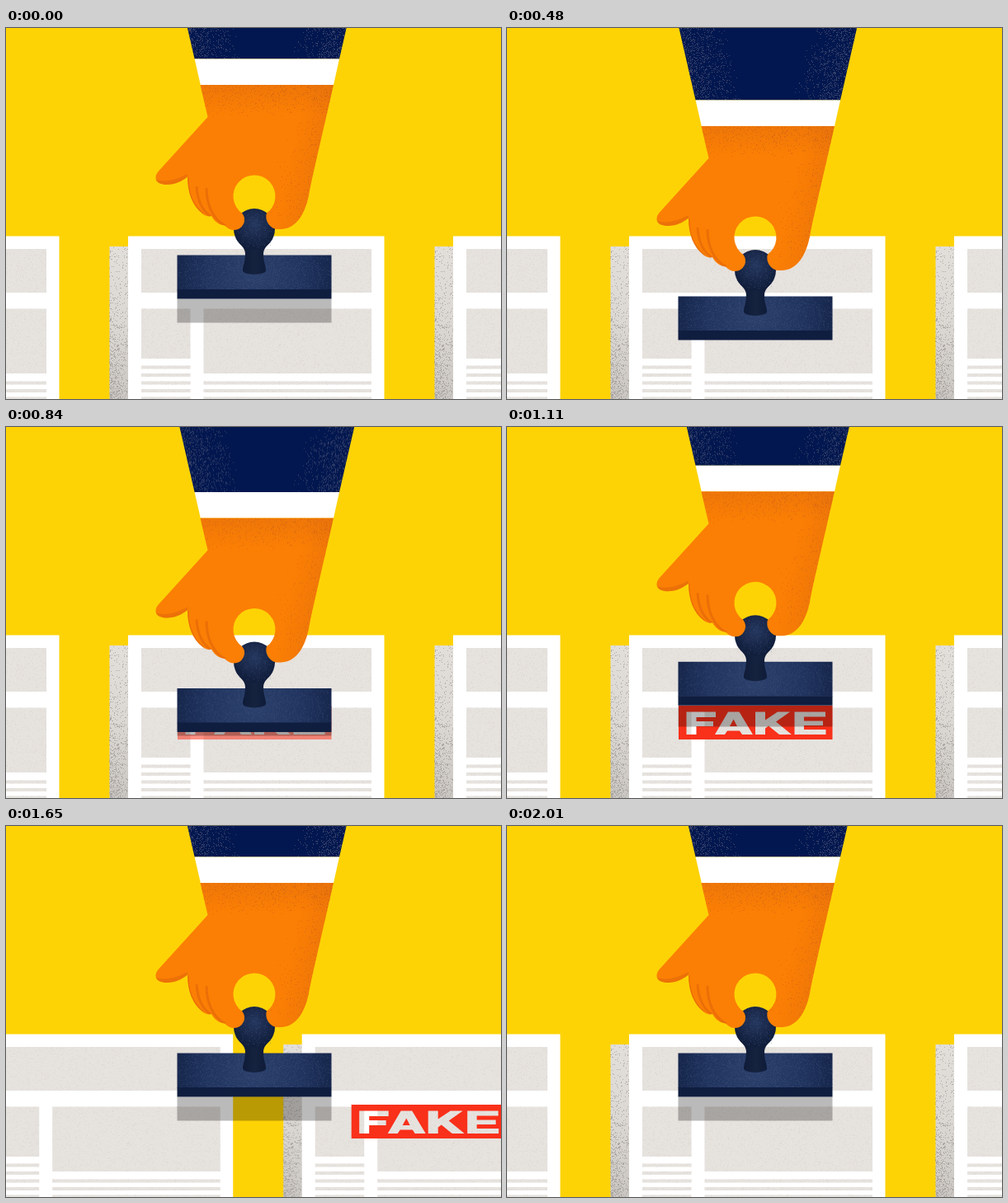
An HTML page with a canvas that plays this animation: 600x450 px, repeating every 2100 ms.

```html
<!DOCTYPE html>
<html lang="en">
<head>
<meta charset="utf-8">
<title>Stamp</title>
<style>
html, body { margin: 0; width: 100%; height: 100%; overflow: hidden; background: #fdd306; }
canvas { display: block; width: 100vw; height: 100vh; }
</style>
</head>
<body>
<canvas id="stage" width="600" height="450" role="img" aria-label="A hand stamps FAKE on newspapers"></canvas>
<script>
const ctx = document.getElementById('stage').getContext('2d');
const LOOP = 2100, STEP = 30, PITCH = 394;

let seed = 7;
const rnd = () => (seed = seed * 16807 % 2147483647) / 2147483647;

// Fine grain inside a box; density(u, v) gives the chance of a speck.
function grain(n, x, y, w, h, density) {
  const path = new Path2D();
  while (n--) {
    const u = rnd(), v = rnd();
    if (rnd() < density(u, v)) path.rect(Math.round(x + u * w), Math.round(y + v * h), 1, 1);
  }
  return path;
}

function box(x, y, w, h) {
  const path = new Path2D();
  path.rect(x, y, w, h);
  return path;
}

function gradient(g, ...stops) {
  stops.forEach(([at, color]) => g.addColorStop(at, color));
  return g;
}
const linear = (x0, y0, x1, y1, ...stops) => gradient(ctx.createLinearGradient(x0, y0, x1, y1), ...stops);
const radial = (x, y, r, ...stops) => gradient(ctx.createRadialGradient(x, y, 0, x, y, r), ...stops);

function fill(path, color, rule = 'nonzero') {
  ctx.fillStyle = color;
  ctx.fill(path, rule);
}

function inside(path, draw) {
  ctx.save();
  ctx.clip(path);
  draw();
  ctx.restore();
}

// Page parts
const blocks = new Path2D();
blocks.rect(164, 268, 279, 53);
blocks.rect(164, 340.5, 59.5, 60.5);
blocks.rect(239.5, 340.5, 203.5, 78.5);
for (let i = 0; i < 5; i++) {
  const y = 409.5 + 9.5 * i;
  blocks.rect(164, y, 59.5, 4);
  if (i > 1) blocks.rect(239.5, y, 203.5, 4);
}
const pageGrain = grain(9000, 164, 268, 279, 182, () => .6);
const side = box(125.5, 265, 23, 185);
const sideGrain = grain(4200, 125, 265, 23, 185, (u, v) => .05 + .5 * v * v * (1.1 - u));

// Red print with the lettering cut out
const print = new Path2D(
  'M208 338H394.5V379H208Z' +
  'M217.5 345.5H253V352H229.5V357H250V363H229.5V373H217.5Z' +
  'M252 373L268 345.5H281.5L298 373H285L282 368.5H267L264 373ZM270 363H279L274.6 354.5Z' +
  'M301 345.5H313V355.5L328 345.5H343L326 357.5L345 373H330L317 362.5L313 365.5V373H301Z' +
  'M348.5 345.5H386V351.5H360V356.5H383V362H360V367H386.5V373H348.5Z');

// Arm, hand and stamp at rest
const sleeve = new Path2D('M201.6 -80L228.6 37.5H404L431 -80Z');
const cuff = new Path2D('M228.6 37.5L235.8 69H397L404 37.5Z');
const hand = new Path2D(
  'M235.5 69L244.5 108L185.5 173C178 181 181 190 195 190C205 190 213 186 220 180.5' +
  'C220 200 226 216 238 225C241 228 246 229 249 228C252 234 258 239 265 239.5' +
  'C268 243 272 245 276.5 245A12.5 12.5 0 0 0 286.5 225A25.5 25.5 0 1 1 316 224.6' +
  'C314 230 316 241 327 244H334C354 243 363 222 367 203C369 192 372 178 375 165L397 69Z');
const creases = new Path2D(
  'M220 181C220 200 226 216 239 226M231 192C232 208 238 222 249 229M243 194C243 213 250 232 266 240');
const fingerShade = new Path2D('M180 183Q195 190 220 177V184L198 194L180 190Z');
const knob = new Path2D();
knob.arc(301, 244, 25, 0, 7);
const neck = new Path2D(
  'M278.5 255C283 263 290 266 290 274C290 284 287 288 287 294A14 5 0 0 0 315 294' +
  'C315 288 312 284 312 274C312 266 319 263 323.5 255Z');
const baseTop = box(207.5, 275.5, 187, 42), baseFront = box(207.5, 317, 187, 11.5);

const edge = u => Math.abs(2 * u - 1);
const sleeveGrain = grain(20000, 202, -80, 229, 118, (u, v) => .8 * Math.max(0, edge(u) + .25 * v - .5));
const handGrain = grain(9000, 225, 69, 175, 160, (u, v) =>
  .5 * Math.max(0, 1 - v * 4) + .75 * Math.max(0, u + v * .23 - .72));
const baseGrain = grain(6000, 208, 276, 186, 41, u => .5 - .35 * edge(u));
const knobGrain = grain(500, 279, 222, 44, 44, u => .6 - .5 * edge(u));

// Height keys: time, descent, speed
const keys = [
  [0, 0, .06], [240, 32, .125], [480, 50, .14], [550, 63, 0],
  [840, 41.5, -.125], [1110, 9.3, -.07], [1350, 0, 0]
];
function descent(t) {
  const i = keys.findIndex(k => k[0] > t);
  if (i < 0) return 0;
  const [t0, a, va] = keys[i - 1], [t1, b, vb] = keys[i];
  const d = t1 - t0, x = (t - t0) / d, y = 1 - x;
  return a * y * y * (1 + 2 * x) + b * x * x * (3 - 2 * x) + d * x * y * (va * y - vb * x);
}

const clamp = x => Math.min(1, Math.max(0, x));
const slide = t => PITCH * (1 - (1 - clamp((t - 1530) / 480)) ** 2.66);

function drawPage(x) {
  ctx.save();
  ctx.translate(x, 0);
  fill(side, linear(0, 265, 0, 450, [0, '#e2deda'], [.5, '#dbd7d3'], [1, '#cac6c2']));
  fill(sideGrain, 'rgba(140,136,132,.55)');
  fill(box(148, 252.5, 310.5, 200), '#fff');
  fill(blocks, '#e6e2de');
  inside(blocks, () => fill(pageGrain, '#dfdad6'));
  ctx.restore();
}

function drawStamp() {
  fill(baseTop, radial(301, 300, 105, [0, '#2a3f6b'], [.55, '#20345f'], [1, '#142347']));
  fill(baseGrain, 'rgba(66,84,122,.35)');
  fill(baseFront, '#0f1d3f');
  fill(neck, linear(287, 0, 316, 0, [0, '#0f1b38'], [.5, '#15233f'], [1, '#0f1b38']));
  fill(knob, radial(301, 238, 28, [0, '#25375f'], [1, '#111e3c']));
  fill(knobGrain, 'rgba(66,84,122,.35)');
}

function drawArm() {
  fill(sleeve, '#02174f');
  inside(sleeve, () => fill(sleeveGrain, '#36426a'));
  fill(cuff, '#fff');
  fill(hand, '#fb7f04');
  inside(hand, () => {
    fill(hand, linear(0, 69, 0, 105, [0, 'rgba(205,95,20,.25)'], [1, 'rgba(205,95,20,0)']));
    fill(hand, linear(350, 130, 389, 139, [0, 'rgba(205,95,20,0)'], [1, 'rgba(205,95,20,.25)']));
    fill(handGrain, 'rgba(200,92,24,.5)');
    fill(fingerShade, 'rgba(205,88,15,.35)');
    ctx.strokeStyle = 'rgba(215,92,12,.45)';
    ctx.lineWidth = 3;
    ctx.stroke(creases);
  });
}

function draw(t) {
  const drop = descent(t), dx = slide(t);
  fill(box(0, 0, 600, 450), '#fdd306');
  for (let k = -2; k < 2; k++) drawPage(k * PITCH + dx);

  ctx.save();
  ctx.translate(dx, 0);
  ctx.globalAlpha = clamp((t - 570) / 500);
  fill(print, '#f9301a', 'evenodd');
  ctx.restore();

  // The cast shadow shrinks under the stamp as it descends.
  const top = 328.5 + drop, bottom = 357.5 + .7 * drop - .007 * drop * drop;
  if (bottom > top) fill(box(207.5, top, 187, bottom - top), 'rgba(0,0,0,.27)');

  ctx.save();
  ctx.translate(0, drop);
  drawStamp();
  drawArm();
  ctx.restore();
}

const start = performance.now();
function tick() {
  const t = (performance.now() - start) % LOOP;
  draw(Math.floor(t / STEP) * STEP);
  requestAnimationFrame(tick);
}
tick();
</script>
</body>
</html>
```
